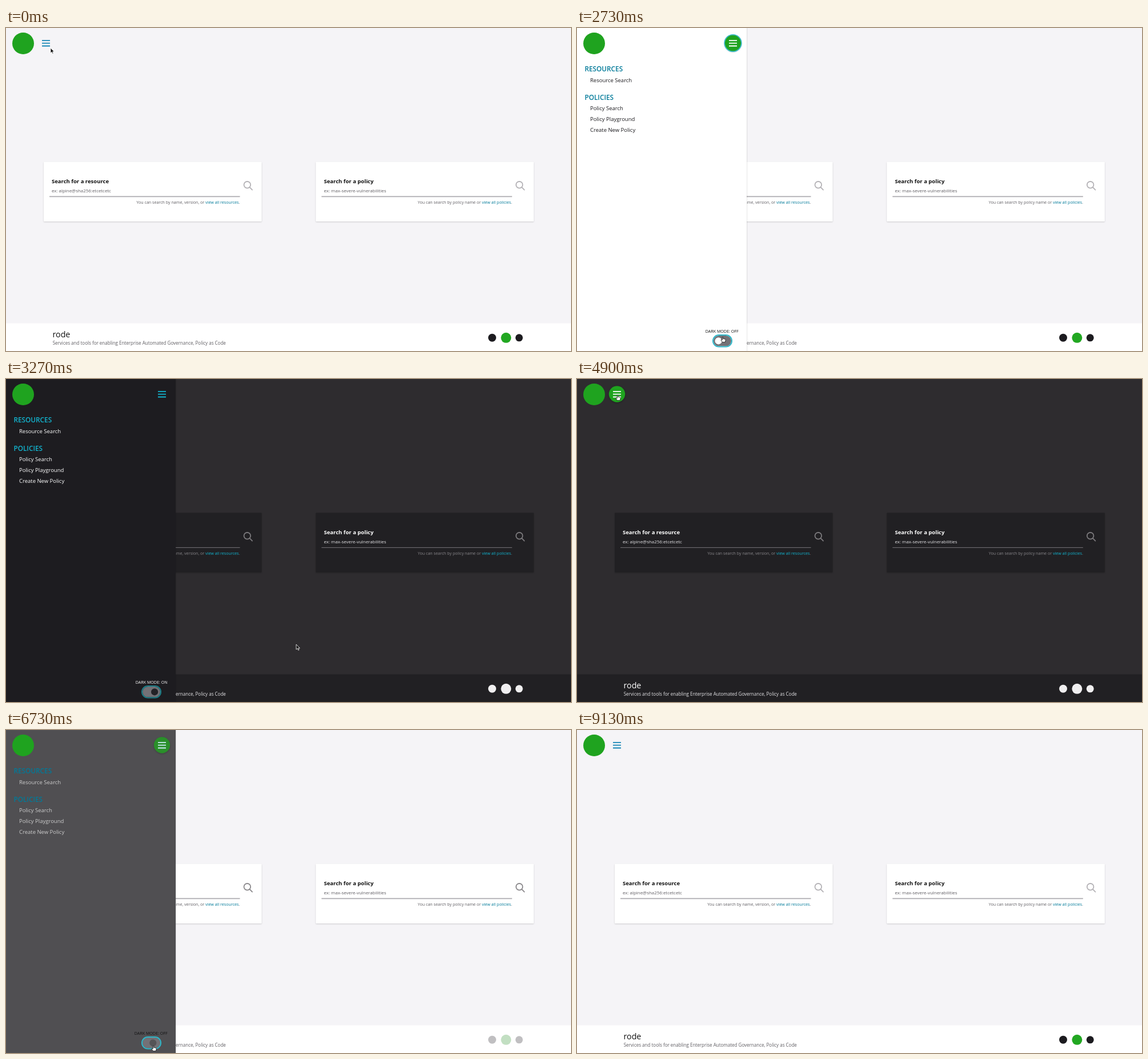
These frames come from a looping animation (989 px wide and 566 px high, 9160 ms). An HTML page:

```html
<!DOCTYPE html>
<html lang="en">
<head>
<meta charset="utf-8">
<title>rode</title>
<style>
/* dark: theme switch, fade: eased theme, open: drawer, hot: menu button fill */
@property --dark { syntax: "<number>"; inherits: true; initial-value: 0; }
@property --fade { syntax: "<number>"; inherits: true; initial-value: 0; }
@property --open { syntax: "<number>"; inherits: true; initial-value: 0; }
@property --hot { syntax: "<number>"; inherits: true; initial-value: 0; }
@property --menu-ring { syntax: "<number>"; inherits: true; initial-value: 0; }
@property --switch-ring { syntax: "<number>"; inherits: true; initial-value: 0; }
@property --hand { syntax: "<number>"; inherits: true; initial-value: 0; }

html, body { margin: 0; width: 100%; height: 100%; overflow: hidden; background: #f5f4f7; }

svg {
  display: block; width: 989px; height: 566px;
  font-family: "Open Sans", "Noto Sans", sans-serif;
  animation-duration: 9160ms;
  animation-iteration-count: infinite;
  animation-name: dark, fade, open, hot, menu-ring, switch-ring, hand;
  animation-timing-function: step-end, ease, ease, ease, step-end, step-end, step-end;
  --d: calc(var(--dark) * 100%);
  --f: calc(var(--fade) * 100%);
  --page: color-mix(in srgb, #2e2c2f var(--d), #f5f4f7);
  --panel: color-mix(in srgb, #212023 var(--d), #fff);
  --title: color-mix(in srgb, #fff var(--d), #111);
  --text: color-mix(in srgb, #e6e5e8 var(--d), #5f5d62);
  --hint: color-mix(in srgb, #8a888c var(--d), #5f5d62);
  --accent: color-mix(in srgb, #12b5d0 var(--d), #007a99);
  --line: color-mix(in srgb, #777579 var(--d), #adabb0);
  --drawer: color-mix(in srgb, #1d1c20 var(--f), #fff);
  --item: color-mix(in srgb, #fff var(--f), #1c1b1f);
  --icon: color-mix(in srgb, #f0eff0 var(--f), #1c1b1f);
  --leaf: color-mix(in srgb, #f0eff0 var(--f), #22a722);
  --lens: color-mix(in srgb, #7d7b7e var(--f), #b3b1b5);
  --bars: color-mix(in srgb, #fff calc(var(--hot) * 100%), color-mix(in srgb, #12b5d0 var(--f), #1585b5));
  --ring: color-mix(in srgb, #1b7f88 var(--d), #2fb7c9);
}
@keyframes dark { 0%, 72.93%, 100% { --dark: 0; } 30.13% { --dark: 1; } }
@keyframes fade { 0%, 30.13%, 76.2%, 100% { --fade: 0; } 33.41%, 72.93% { --fade: 1; } }
@keyframes open {
  0%, 14.74%, 41.48%, 56%, 81.88%, 100% { --open: 0; }
  17.47%, 38.76%, 58.4%, 79.15% { --open: 1; }
}
@keyframes hot {
  0%, 8.3%, 33.41%, 48.36%, 76.2%, 100% { --hot: 0; }
  9.83%, 30.13%, 50%, 72.93% { --hot: 1; }
}
@keyframes menu-ring { 0%, 30.13%, 72.7%, 100% { --menu-ring: 0; } 14.74%, 56% { --menu-ring: 1; } }
@keyframes switch-ring { 0%, 38.76%, 79.15%, 100% { --switch-ring: 0; } 29.26%, 72.27% { --switch-ring: 1; } }
@keyframes hand {
  0%, 15.5%, 31.7%, 56.9%, 74.6%, 100% { --hand: 0; }
  8.5%, 26%, 48.6%, 70.5% { --hand: 1; }
}

.page { fill: var(--page); }
.panel { fill: var(--panel); }
.card { filter: drop-shadow(0 1px .8px rgba(0, 0, 0, .17)); }
.title { fill: var(--title); font-size: 9.5px; font-weight: 700; }
.field { fill: var(--text); font-size: 7.92px; }
.hint { fill: var(--hint); font-size: 7.13px; text-anchor: end; }
.hint tspan { fill: var(--accent); }
.rule { stroke: var(--line); stroke-width: calc(1.6px - var(--dark) * .6px); }
.lens { fill: none; stroke: var(--lens); stroke-width: 1.8; stroke-linecap: round; }
.name { fill: var(--title); font-size: 14.25px; }
.about { fill: var(--text); font-size: 8.02px; }
.mark { fill: var(--icon); }
.leaf { fill: var(--leaf); }
.brand { fill: #1fa31f; }

.drawer { transform: translateX(calc((var(--open) - 1) * 300px)); }
.sheet { fill: var(--drawer); filter: drop-shadow(0 0 1px rgba(0, 0, 0, .25)); }
.head { fill: var(--accent); font-size: 11.8px; font-weight: 600; }
.item { fill: var(--item); font-size: 9.5px; }
.mode { fill: var(--title); font-size: 7.13px; text-anchor: end; }
.off { opacity: calc(1 - var(--dark)); }
.on { opacity: var(--dark); }
.track { fill: #737176; }
.focus { fill: none; stroke: var(--ring); stroke-width: 2; opacity: var(--switch-ring); }
.knob {
  fill: color-mix(in srgb, #232226 var(--f), #fff);
  transform: translateX(calc(var(--fade) * 12.5px));
}

.menu { transform: translateX(calc(var(--open) * 203px)); }
.disc { fill: #1fa31f; opacity: var(--hot); filter: drop-shadow(0 1px 1.5px rgba(0, 0, 0, .3)); }
.halo { fill: none; stroke: var(--ring); stroke-width: 1.6; opacity: var(--menu-ring); }
.bars { stroke: var(--bars); stroke-width: 1.8; }

.cursor { animation: move 9160ms infinite ease-in-out, show 9160ms infinite step-end; }
.arrow { opacity: calc(1 - var(--hand)); }
.hand { opacity: var(--hand); }
.cursor path { fill: #111; stroke: #fff; stroke-width: .8; stroke-linejoin: round; }
.cursor .hand { fill: #fff; stroke: #111; }
@keyframes move {
  0%, 7.64%, 100% { transform: translate(78px, 35px); }
  9%, 17.5% { transform: translate(70px, 28px); }
  27%, 31.5% { transform: translate(255px, 541px); }
  35.5%, 38.8% { transform: translate(508px, 465px); }
  45.1%, 47.7% { transform: translate(80px, 44px); }
  49.5%, 57% { transform: translate(71px, 28px); }
  61.46% { transform: translate(328px, 427px); }
  67.7% { transform: translate(270px, 540px); }
  71%, 74.5% { transform: translate(258px, 553px); }
  77.8%, 79.5% { transform: translate(480px, 460px); }
  88.1% { transform: translate(890px, 300px); }
}
@keyframes show { 0% { opacity: 1; } 88.1%, 100% { opacity: 0; } }
</style>
</head>
<body>
<svg viewBox="0 0 989 566">
  <defs>
    <g id="card">
      <rect class="panel card" x="66" y="234.5" width="381.5" height="104.5" rx="1"/>
      <path class="rule" d="M76 295.4H409.5"/>
      <g class="lens"><circle cx="422.3" cy="274.8" r="5.8"/><path d="M426.6 279.2L431 283.7"/></g>
    </g>
  </defs>

  <rect class="page" width="989" height="566"/>

  <use href="#card"/>
  <text class="title" x="80" y="272.3">Search for a resource</text>
  <text class="field" x="80" y="288.3">ex: alpine@sha256:etcetcetc</text>
  <text class="hint" x="409.4" y="308.3">You can search by name, version, or <tspan>view all resources</tspan>.</text>

  <use href="#card" x="476.3"/>
  <text class="title" x="556.5" y="272.3">Search for a policy</text>
  <text class="field" x="556.5" y="288.3">ex: max-severe-vulnerabilities</text>
  <text class="hint" x="885.8" y="308.3">You can search by policy name or <tspan>view all policies</tspan>.</text>

  <rect class="panel" y="517.5" width="989" height="49"/>
  <text class="name" x="81.5" y="542.4">rode</text>
  <text class="about" x="81.7" y="555.3">Services and tools for enabling Enterprise Automated Governance, Policy as Code</text>
  <circle class="mark" cx="851" cy="542.8" r="7"/>
  <circle class="leaf" cx="875.3" cy="542.8" r="9"/>
  <circle class="mark" cx="898.2" cy="542.8" r="6.5"/>

  <g class="drawer">
    <rect class="sheet" y="-4" width="297" height="574"/>
    <text class="head" x="13.4" y="76.4">RESOURCES</text>
    <text class="item" x="23" y="94.7">Resource Search</text>
    <text class="head" x="13.4" y="125.5">POLICIES</text>
    <text class="item" x="23" y="143.8">Policy Search</text>
    <text class="item" x="23" y="163.1">Policy Playground</text>
    <text class="item" x="23" y="182.2">Create New Policy</text>
    <text class="mode off" x="282.7" y="534.1">DARK MODE: OFF</text>
    <text class="mode on" x="282.7" y="534.1">DARK MODE: ON</text>
    <rect class="track" x="239" y="539" width="31" height="18.6" rx="9.3"/>
    <rect class="focus" x="238" y="538" width="33" height="20.6" rx="10.3"/>
    <circle class="knob" cx="247.6" cy="548.3" r="6.1"/>
  </g>

  <circle class="brand" cx="30" cy="27" r="19"/>

  <g class="menu">
    <circle class="disc" cx="70" cy="26.5" r="14.2"/>
    <circle class="halo" cx="70" cy="26.5" r="14.8"/>
    <path class="bars" d="M63 21.9H77M63 26.7H77M63 31.5H77"/>
  </g>

  <g class="cursor">
    <path class="arrow" d="M0 0V9L2.1 7.1L3.6 10.3L5 9.6L3.6 6.6H6.3Z"/>
    <path class="hand" d="M-.8 .8Q0-.4 .8 .8V3.8Q2 3 2.5 4Q3.5 3.4 4 4.4Q5.2 4 5.2 5.4L4.4 9.4H-.6L-3 6Q-3 4.6-1.6 5.2L-.8 6Z"/>
  </g>
</svg>
</body>
</html>
```
